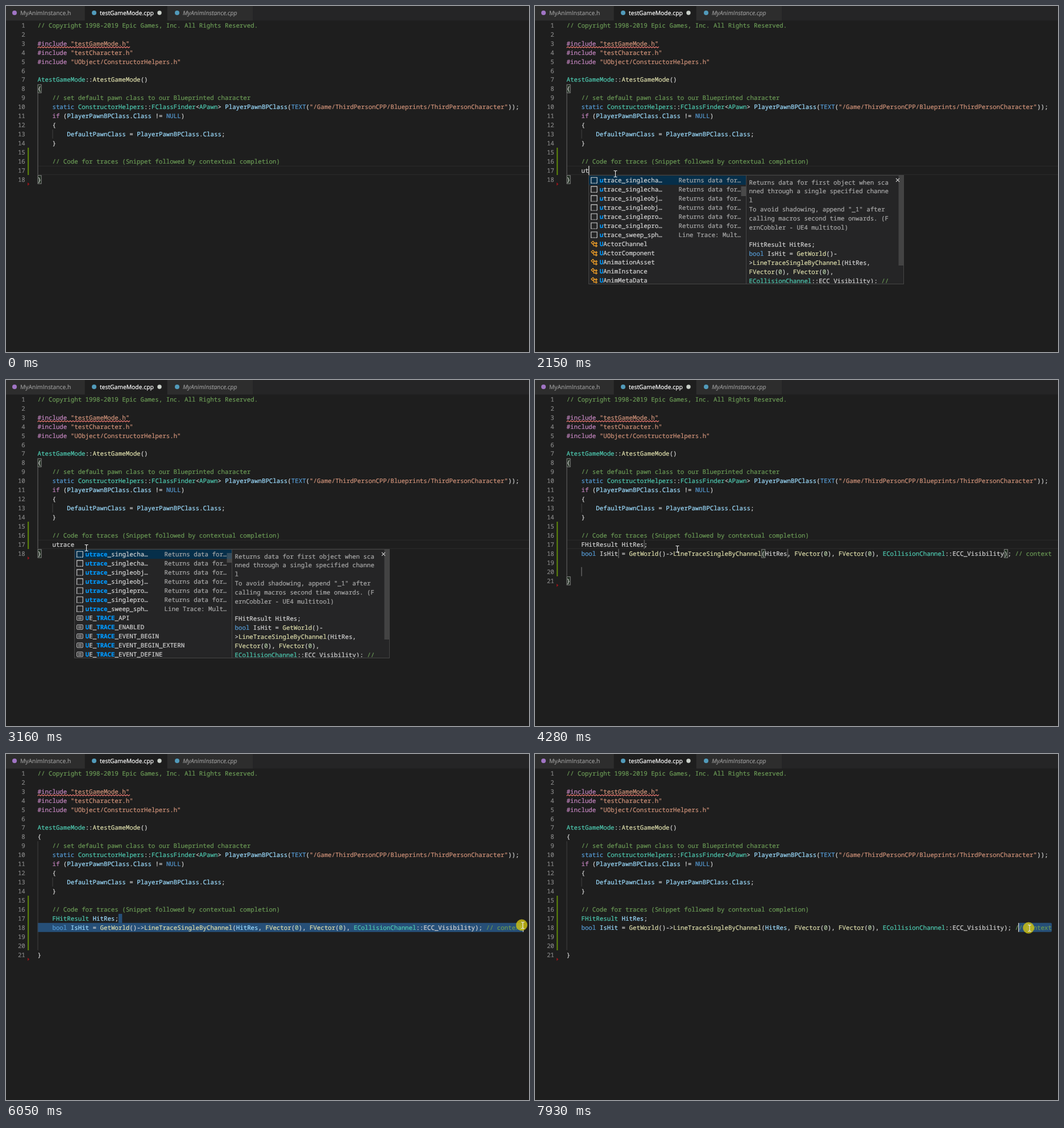
Write an HTML page that moves like this. It is 920 by 608 pixels and loops after 8000 ms.

```html
<!DOCTYPE html>
<html lang="en">
<head>
<meta charset="utf-8">
<title>Code snippet completion</title>
<style>
html, body { margin: 0; width: 100%; height: 100%; overflow: hidden; background: #1e1e1e; }
svg { display: block; width: 920px; height: 608px; }
text { white-space: pre; text-rendering: geometricPrecision; }
text, tspan { fill: currentColor; stroke: currentColor; stroke-width: .22px; }
.code { font: 10.777px "Noto Sans Mono", "DejaVu Sans Mono", monospace; }
.ui { font: 10.35px "Open Sans", "Noto Sans", sans-serif; }
.d { color: #d4d4d4 } .c { color: #6a9955 } .p { color: #c586c0 } .s { color: #ce9178 }
.t { color: #4ec9b0 } .f { color: #dcdcaa } .v { color: #9cdcfe } .k { color: #569cd6 }
.n { color: #b5cea8 } .g { color: #a8a8a8 } .l { color: #858585 }
.m { color: #0097fb; font-weight: bold }
</style>
</head>
<body>
<svg viewBox="0 0 920 608" xmlns="http://www.w3.org/2000/svg">
  <g id="under"></g>
  <g id="base"></g>
  <g id="over"></g>
</svg>
<script>
const LOOP = 8000, CW = 6.466, LH = 15.96, LEFT = 55.6;
const colX = c => LEFT + c * CW;
const lineY = n => 25.5 + (n - 1) * LH;
const esc = s => s.replace(/&/g, '&amp;').replace(/</g, '&lt;');

const rect = (x, y, w, h, fill, extra = '') =>
  `<rect x="${x}" y="${y}" width="${w}" height="${h}" fill="${fill}" ${extra}/>`;
const path = (d, stroke, w = 1, extra = '') =>
  `<path d="${d}" fill="none" stroke="${stroke}" stroke-width="${w}" ${extra}/>`;
const dot = (x, y, r, fill) => `<circle cx="${x}" cy="${y}" r="${r}" fill="${fill}"/>`;

// Tokens are split by "|"; the first letter of each is its colour class.
function tokens(x, y, src) {
  let col = 0;
  const spans = src.split('|').map(tok => {
    const s = `<tspan class="${tok[0]}" x="${(x + col * CW).toFixed(2)}">${esc(tok.slice(1))}</tspan>`;
    col += tok.length - 1;
    return s;
  });
  return `<text class="code" y="${y.toFixed(2)}">${spans.join('')}</text>`;
}
const code = (n, col, src) => tokens(colX(col), lineY(n) + 12.2, src);
const lineNo = n =>
  `<text class="code l" x="33.8" y="${(lineY(n) + 12.2).toFixed(2)}" text-anchor="end">${n}</text>`;
const bracket = (n, col) =>
  rect(colX(col) + .4, lineY(n) + 1, CW - .4, 14.4, '#1d2a1d', 'stroke="#888" stroke-width="1"');
const caret = (n, col) => rect(Math.floor(colX(col)), lineY(n), 1.4, LH, '#c8c9c7');

function drawBase() {
  const tab = (x, label, color, style = '') =>
    `<text class="ui" x="${x}" y="16" style="color:${color};${style}">${label}</text>`;
  let squiggle = 'M55.5 73.5';
  for (let i = 0; i < 65; i++) squiggle += `l2.5 ${i % 2 ? 2 : -2}`;
  let s = rect(0, 0, 920, 25.5, '#252526') + rect(0, 0, 138.5, 25.5, '#2d2d2d') +
    rect(139, 0, 144.5, 25.5, '#1e1e1e') + rect(284, 0, 150, 25.5, '#2d2d2d') +
    dot(15, 12, 4, '#a074c4') + dot(155, 12, 4, '#519aba') + dot(301, 12, 4, '#519aba') +
    tab(25, 'MyAnimInstance.h', '#969696') + tab(165, 'testGameMode.cpp', '#fff') +
    tab(311, 'MyAnimInstance.cpp', '#969696', 'font-style:italic;font-size:10.5px') +
    dot(270, 12, 3.7, '#c9d0c9') + path(squiggle, '#ee7a72', 1.05);
  for (let n = 1; n <= 18; n++) s += lineNo(n);
  return s +
    code(1, 0, 'c// Copyright 1998-2019 Epic Games, Inc. All Rights Reserved.') +
    code(3, 0, 'p#include |s"testGameMode.h"') +
    code(4, 0, 'p#include |s"testCharacter.h"') +
    code(5, 0, 'p#include |s"UObject/ConstructorHelpers.h"') +
    code(7, 0, 'tAtestGameMode|d::|fAtestGameMode|d()') +
    code(9, 4, 'c// set default pawn class to our Blueprinted character') +
    code(10, 4, 'kstatic |tConstructorHelpers|d::|tFClassFinder|d<|tAPawn|d> |vPlayerPawnBPClass|d(|kTEXT|d(|s"/Game/ThirdPersonCPP/Blueprints/ThirdPersonCharacter"|d));') +
    code(11, 4, 'pif|d (|vPlayerPawnBPClass|d.|vClass|d != |kNULL|d)') +
    code(12, 4, 'd{') +
    code(13, 8, 'vDefaultPawnClass|d = |vPlayerPawnBPClass|d.|vClass|d;') +
    code(14, 4, 'd}') +
    code(16, 4, 'c// Code for traces (Snippet followed by contextual completion)');
}

const snippetRows = ['singlecha', 'singlecha', 'singleobj', 'singleobj', 'singlepro', 'singlepro', 'sweep_sph'];
const classRows = ['ActorChannel', 'ActorComponent', 'AnimationAsset', 'AnimInstance', 'AnimMetaData'];
const macroRows = ['API', 'ENABLED', 'EVENT_BEGIN', 'EVENT_BEGIN_EXTERN', 'EVENT_DEFINE'];
const docText = [
  'Returns data for first object when sca', 'nned through a single specified channe', 'l',
  'To avoid shadowing, append "_1" after', 'calling macros second time onwards. (F', 'ernCobbler - UE4 multitool)'
];
const docCode = [
  'dFHitResult HitRes;', 'kbool|d IsHit = |fGetWorld|d()-', 'd>|fLineTraceSingleByChannel|d(HitRes,',
  'fFVector|d(|n0|d), |fFVector|d(|n0|d),', 'tECollisionChannel|d::ECC_Visibility); |c//'
];

function rowIcon(kind, x, y) {
  if (kind === 'snippet')
    return path(`M${x + .5} ${y + 5}v-10h10.5v10`, '#d4d4d4', 1.1) +
      path(`M${x} ${y + 5.2}h11.5`, '#d4d4d4', 1.1, 'stroke-dasharray="2 1"');
  if (kind === 'macro')
    return rect(x + .5, y - 3.7, 10.5, 8, 'none', 'stroke="#d4d4d4" rx="1"') +
      path(`M${x + 2.5} ${y - 1}h6.5m-6.5 2.6h6.5`, '#d4d4d4');
  return path(`M${x + .8} ${y - 2}l3 -2.6l2.4 2.6l-3 2.6zM${x + 5} ${y - 1}h3.5M${x + 5} ${y}v3.5h3.5` +
    `M${x + 8} ${y - 1}l1.5 -1.5l1.5 1.5l-1.5 1.5zM${x + 8} ${y + 3.6}l1.5 -1.5l1.5 1.5l-1.5 1.5z`, '#ee9d28', 1.3);
}

function popup(x, filtered) {
  const W = 277, top = 297.5, H = 191;
  let s = rect(x, top, 2 * W, H, '#252526', 'stroke="#454545"') +
    rect(x + .5, top + .8, W - 1, LH, '#062f4a') + path(`M${x + W} ${top}v${H}`, '#454545');
  const row = (i, kind, label, detail) => {
    const y = 310 + i * LH;
    s += rowIcon(kind, x + 3.7, y - 3.8) + tokens(x + 19.3, y, label);
    if (detail) s += tokens(x + 158, y, 'g' + detail);
  };
  snippetRows.forEach((name, i) => row(i, 'snippet',
    (filtered ? 'mutrace|d_' : 'mu|dtrace_') + name + '…',
    i < 6 ? 'Returns data for…' : 'Line Trace: Mult…'));
  if (filtered) macroRows.forEach((name, i) => row(i + 7, 'macro', 'mU|dE_|mTRACE|d_' + name));
  else classRows.forEach((name, i) => row(i + 7, 'class', 'mU|d' + name));
  s += rect(x + W - 9, filtered ? 304 : 317, 8.5, 17, '#797979', 'opacity=".42"');
  docText.forEach((line, i) => s += tokens(x + 282, 313.5 + i * LH, 'g' + line));
  docCode.forEach((line, i) => s += tokens(x + 282, 422.7 + i * LH, line));
  // The last documentation line is cut off just below its baseline.
  return s + rect(x + W + .5, 487, W - 1, 1, '#252526') + path(`M${x + W} ${top + H}h${W}`, '#454545') +
    rect(x + 2 * W - 9, 298, 8.5, 158, '#434343') +
    path(`M${x + 540.5} 302.8l6 6m0 -6l-6 6`, '#d4d4d4', 1.1);
}

// Pointer moves: start time, number of steps, way points.
const moves = [
  [210, 11, [779, 576], [142, 296]],
  [1060, 3, [146, 298], [141.5, 295]],
  [4280, 7, [250.5, 297], [480, 368], [640, 368], [717, 338]],
  [4970, 11, [724, 334], [850, 305], [905, 292], [907, 300]],
  [5820, 4, [907, 300], [909, 301]],
  [6220, 3, [904, 302], [892, 303]],
  [6530, 3, [896, 303], [903, 303]],
  [6850, 11, [907, 303], [852, 305]],
  [7790, 3, [855, 306], [870, 306]]
];

function pointer(t) {
  const move = moves.filter(m => t >= m[0]).pop();
  if (!move) return null;
  const [start, steps, ...pts] = move;
  const u = Math.min(1, Math.floor((t - start + 14) / 77) / (steps - 1));
  const pos = u * u * (3 - 2 * u) * (pts.length - 1);
  const i = Math.min(Math.floor(pos), pts.length - 2), f = pos - i;
  return pts[i].map((a, k) => a + (pts[i + 1][k] - a) * f);
}

const within = (t, a, b) => t >= a && t < b;
const typedAt = [1910, 2060, 2310, 2380, 2460, 2540];

function scene(t) {
  const mouse = pointer(t);
  const inserted = t >= 3550, clicked = t >= 5510;
  const last = inserted ? 21 : 18;
  const endCol = 132;
  const dragCol = t < 6850 ? endCol : t >= 7790 ? 123 :
    Math.max(123, Math.min(endCol, Math.round((mouse[0] - LEFT) / CW)));
  const selectLines = within(t, 5740, 6530), selectTail = dragCol < endCol;
  const selecting = selectLines || selectTail;
  const brackets = !(within(t, 5820, 6530) || selectTail);

  let under = '', over = '';
  if (!selecting && !within(t, 6530, 6850)) {
    const y = lineY(t >= 6850 ? 18 : 17);
    under += path(`M57 ${y + .5}H920M57 ${y + LH - .5}H920`, '#2b2b2b');
  }
  if (selectLines)
    under += rect(colX(22), lineY(17), CW, LH, '#264f78') + rect(LEFT, lineY(18), endCol * CW, LH, '#264f78');
  if (selectTail)
    under += rect(colX(dragCol), lineY(18), (endCol - dragCol) * CW, LH, '#264f78', 'rx="2"');
  under += path(`M56 ${lineY(9)}V${lineY(last)}`, selecting ? '#404040' : '#6a6a6a') +
    path(`M82 ${lineY(13)}V${lineY(14)}`, '#404040');
  if (brackets) under += bracket(8, 0) + bracket(last, 0);

  over += code(8, 0, 'd{') + code(last, 0, 'd}') +
    rect(38, 249, 2.3, t >= 3800 ? 96 : 48, '#587c0c') +
    `<path d="M38 ${lineY(last) + 13.3}l3.3 2.8l-3.3 2.8z" fill="#94151b"/>`;

  if (!inserted) {
    const typed = typedAt.filter(a => t >= a).length;
    if (typed) over += code(17, 4, 'd' + 'utrace'.slice(0, typed));
    if (within(t, 1130, 1610) || within(t, 1910, 3090)) over += caret(17, 4 + typed);
    if (t >= 2150) over += popup(Math.floor(colX(4 + typed)) + .5, t >= 2930);
  } else {
    const known = t >= 5050;
    const type = known ? 't' : 'd', name = known ? 'v' : 'd';
    for (let n = 19; n <= 21; n++) over += lineNo(n);
    const stops = [[17, 21], [18, 14], [18, 60]];
    if (!clicked) {
      under += bracket(18, 53) + bracket(18, 119);
      stops.forEach(([n, c]) => under += rect(colX(c), lineY(n), 1.8, LH, '#555'));
      under += rect(81.3, lineY(20), 1.2, LH, '#707070');
    }
    over += code(17, 4, `${type}FHitResult|d |${name}HitRes|d;`) +
      code(18, 4, `kbool |${name}IsHit|d = |fGetWorld|d()->|fLineTraceSingleByChannel|d(|${name}HitRes|d, |fFVector|d(|n0|d), |fFVector|d(|n0|d), |tECollisionChannel|d::ECC_Visibility); |c// context`);
    if (within(t, 3620, 4050) || within(t, 4590, 5050))
      stops.forEach(([n, c]) => over += caret(n, c));
    if (clicked) over += t < 5740 ? caret(17, 22) : caret(18, dragCol);
  }

  if (mouse) {
    const [x, y] = mouse;
    if (within(t, 5510, 6360) || t >= 6530)
      over += `<circle cx="${x - 1.8}" cy="${y - .5}" r="10" fill="#d2c410" opacity=".8"/>`;
    const beam = 'M-3 -5.5h2l1 1l1 -1h2M0 -4.5v9M-3 5.5h2l1 -1l1 1h2';
    over += path(beam, '#e8e8e8', 1.1, `transform="translate(${x} ${y})"`);
  }
  return { under, over };
}

const layers = { under: document.getElementById('under'), over: document.getElementById('over') };
const shown = {};
document.getElementById('base').innerHTML = drawBase();

function update(t) {
  const next = scene(t);
  for (const id in layers) {
    if (shown[id] !== next[id]) layers[id].innerHTML = shown[id] = next[id];
  }
}

const begin = performance.now();
function tick() {
  update((performance.now() - begin) % LOOP);
  requestAnimationFrame(tick);
}
tick();
</script>
</body>
</html>
```
